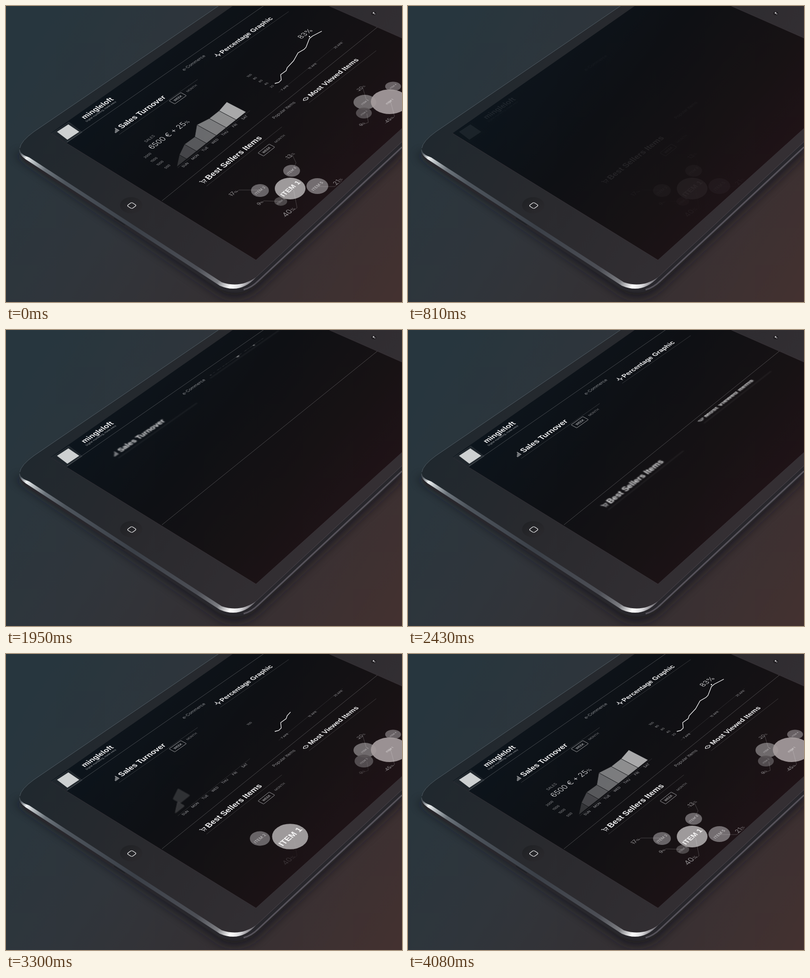
An HTML page for the animation above (4.11 s loop, 800 by 600 pixels).

```html
<!DOCTYPE html>
<html lang="en">
<head>
<meta charset="utf-8">
<title>Dashboard on a tablet</title>
<style>
html, body { margin: 0; width: 100%; height: 100%; overflow: hidden; background: #303136; }
svg { display: block; width: 100vw; height: 100vh; }
text { text-anchor: middle; }
.bold { font-family: "Liberation Sans", Arial, sans-serif; font-weight: 700; }
.thin { font-family: Inter, "Liberation Sans", sans-serif; font-weight: 300; }
.mid { font-family: Inter, "Liberation Sans", sans-serif; font-weight: 400; }
</style>
</head>
<body>
<svg id="stage" viewBox="0 0 800 600" preserveAspectRatio="xMidYMid slice">
  <defs>
    <linearGradient id="desk" gradientUnits="userSpaceOnUse" x1="20" y1="130" x2="790" y2="590">
      <stop offset="0" stop-color="#27363e"/><stop offset=".36" stop-color="#30353b"/>
      <stop offset=".66" stop-color="#353033"/><stop offset="1" stop-color="#433130"/>
    </linearGradient>
    <linearGradient id="face" gradientUnits="userSpaceOnUse" x1="80" y1="220" x2="600" y2="520">
      <stop offset="0" stop-color="#20282e"/><stop offset=".45" stop-color="#2a2a2e"/><stop offset="1" stop-color="#342f33"/>
    </linearGradient>
    <linearGradient id="glass" gradientUnits="userSpaceOnUse" x1="190" y1="110" x2="640" y2="470">
      <stop offset="0" stop-color="#0c151d"/><stop offset=".4" stop-color="#0e1014"/>
      <stop offset=".75" stop-color="#171214"/><stop offset="1" stop-color="#201317"/>
    </linearGradient>
    <linearGradient id="bevel" gradientUnits="userSpaceOnUse" x1="28" y1="300" x2="500" y2="575">
      <stop offset="0" stop-color="#454e56"/><stop offset=".028" stop-color="#eef1f2"/><stop offset=".055" stop-color="#bcc2c6"/>
      <stop offset=".11" stop-color="#6c747b"/><stop offset=".2" stop-color="#4d545c"/><stop offset=".5" stop-color="#3b4048"/>
      <stop offset=".78" stop-color="#4c4e55"/><stop offset=".87" stop-color="#7b7c81"/><stop offset=".92" stop-color="#fff"/>
      <stop offset=".95" stop-color="#dadadd"/><stop offset=".985" stop-color="#625f66"/><stop offset="1" stop-color="#46434a"/>
    </linearGradient>
    <linearGradient id="knob" x1="0" y1="0" x2="1" y2="1">
      <stop offset="0" stop-color="#1f2124"/><stop offset="1" stop-color="#2c2a2e"/>
    </linearGradient>
    <filter id="shade" x="-20%" y="-20%" width="140%" height="140%"><feGaussianBlur stdDeviation="10"/></filter>
    <filter id="blur" x="-20%" y="-60%" width="140%" height="220%"><feGaussianBlur stdDeviation="1"/></filter>
    <clipPath id="screen"><path d="M90 258L458 0H653L800 65V248L505 515Z"/></clipPath>
    <clipPath id="slot"><path d="M-30-22H260V60H-30Z"/></clipPath>
  </defs>
  <rect width="800" height="600" fill="url(#desk)"/>
  <path d="M17 300L436 587Q474 602 508 574L800 300V250L300 300Z" fill="#15171b" opacity=".74" filter="url(#shade)"/>
  <path d="M28 292Q24 306 44 320L430 573Q478 594 513 558L800 291V260L300 250Z" fill="#28272c"/>
  <path d="M480 575Q496 571 511 556L800 286" stroke="#57535b" stroke-width="3" fill="none"/>
  <path d="M27 291Q25 301 40 311L432 567Q474 585 506 549L490 540L60 284Z" fill="url(#bevel)"/>
  <path d="M429 0L56 255Q22 280 29 295Q32 302 47 307L436 560Q474 573 506 549L800 275V0Z" fill="url(#face)"/>
  <path d="M429 0L56 255Q30 274 28 288" fill="none" stroke="#4d5860" stroke-width="1"/>
  <path d="M506 549L800 275" fill="none" stroke="#4b454c" stroke-width="1"/>
  <path d="M90 258L458 0H653L800 65V248L505 515Z" fill="url(#glass)"/>
  <path d="M90 258L505 515L800 248M653 0L800 65" fill="none" stroke="#423a40" stroke-width=".6"/>
  <path d="M218 430L240 444" stroke="#1d2025" stroke-width="2"/>
  <ellipse cx="253" cy="404" rx="22.5" ry="16.5" fill="url(#knob)"/>
  <rect id="home" x="-5.8" y="-5.8" width="11.6" height="11.6" rx="2.8" fill="none" stroke="#e4e4e6" stroke-width="1.3"/>
  <ellipse cx="743" cy="15" rx="5" ry="3.8" fill="#1f1d20"/>
  <circle cx="742.5" cy="14" r="1.7" fill="#c4c2c5"/><circle cx="745" cy="16" r="1.2" fill="#8d8a8e"/>
  <g id="ui" clip-path="url(#screen)"></g>
</svg>
<script>
const LOOP = 4110, START = 1620;
const ui = document.getElementById('ui');
const items = [];
const clamp = v => Math.max(0, Math.min(1, v));
const easeInOut = p => p < .5 ? 2 * p * p : 1 - 2 * (1 - p) ** 2;
const easeOut = p => 1 - (1 - p) ** 3;
const back = p => 1 + 4.4 * (p - 1) ** 3 + 3.4 * (p - 1) ** 2;

// Local directions of the screen plane, in radians
function axes(x, y) {
  const across = -33.9 - 7.5 * (.568 * (x - 90) + .823 * (y - 258)) / 447;
  const down = 31.8 - 9 * (.526 * (x - 90) - .85 * (y - 258)) / 511;
  return [across, down].map(d => d * Math.PI / 180);
}
function tilt(x, y) {
  const [a, b] = axes(x, y);
  return `matrix(${[Math.cos(a), Math.sin(a), Math.cos(b), Math.sin(b), x, y].map(v => v.toFixed(4))})`;
}
function raise(x, y, h) {
  const b = axes(x, y)[1];
  return [x - h * Math.cos(b), y - h * Math.sin(b)];
}
function el(tag, attrs, parent = ui) {
  const node = document.createElementNS('http://www.w3.org/2000/svg', tag);
  for (const k in attrs) node.setAttribute(k, attrs[k]);
  return parent.appendChild(node);
}
function label(parent, x, y, str, size, fill = '#949497', cls = 'mid') {
  const node = el('text', { transform: tilt(x, y), y: size * .36, 'font-size': size, fill, class: cls }, parent);
  node.textContent = str;
  return node;
}
// "late" parts leave in the second half of the exit
function animate(kind, t0, dur, node, late, extra) {
  items.push({ kind, t0, dur, node, late, ...extra });
  return node;
}
const fade = (t0, node, late, dur = 120) => animate('fade', t0, dur, node, late);
const group = () => el('g', {});
const line = (d, color, width, parent) =>
  el('path', { d, fill: 'none', stroke: color, 'stroke-width': width }, parent);

function rule(t0, d) {
  const node = line(d, 'rgba(255,255,255,.32)', .7);
  node.setAttribute('pathLength', 1);
  node.setAttribute('stroke-dasharray', '1 1');
  animate('draw', t0, 250, node);
}

function heading(t0, x, y, str, size, icon, len, late) {
  const slot = el('g', { transform: tilt(x, y), 'clip-path': 'url(#slot)' });
  const inner = el('g', {}, slot);
  const text = el('text', { 'font-size': size, fill: '#f0f0f1', class: 'bold', style: 'text-anchor:start' }, inner);
  text.textContent = str;
  el('path', { d: icon, fill: 'none', stroke: '#d8d8da', 'stroke-width': 1.3 }, inner);
  line(`M-14 7H${len}`, 'rgba(255,255,255,.2)', .7, inner);
  animate('slide', t0, 240, slot, late, { inner });
}

function period(t0, x, y, mx, my, late) {
  const g = group();
  el('rect', { transform: tilt(x, y), x: -14.5, y: -6.5, width: 29, height: 13, rx: 1, fill: 'none', stroke: '#a6a6a9', 'stroke-width': .8 }, g);
  label(g, x, y, 'WEEK', 6.6, '#dcdcde');
  label(g, mx, my, 'MONTH', 6.4, '#808084');
  fade(t0, g, late);
}

function bubble(t0, x, y, rx, ry, color, str, size, ink, late) {
  const g = group();
  el('ellipse', { cx: x, cy: y, rx, ry, fill: color, 'fill-opacity': .92 }, g);
  label(g, x, y, str, size, ink, size > 10 ? 'bold' : 'mid');
  animate('pop', t0, 210, g, late, { x, y });
}

function share(t0, x, y, value, size, path, late) {
  const g = group();
  line(path, 'rgba(255,255,255,.34)', .6, g);
  const text = label(g, x, y, value, size, '#aba9ab', 'thin');
  const sign = el('tspan', { 'font-size': size * .6 }, text);
  sign.textContent = '%';
  fade(t0, g, late);
}

document.getElementById('home').setAttribute('transform', tilt(254, 404.5));

// Header
const mark = group();
el('path', { d: 'M92 258L127 235L154 256L123 277Z', fill: '#1f262c', stroke: '#2f363c', 'stroke-width': .7 }, mark);
el('path', { d: 'M103 255L126 240L148 255L124 271Z', fill: '#cdd0d1' }, mark);
fade(1620, mark, true, 180);
const brand = group();
label(brand, 184, 207, 'mingleloft', 15, '#f1f1f2', 'bold');
label(brand, 192, 213.5, 'Digital marketing, made easy.', 5.3, '#a5a8ab');
fade(1680, brand, true, 180);
rule(1620, 'M123 276L520 0');
rule(1650, 'M315 395L750 43');
fade(1770, label(ui, 379, 115, 'e-Commerce', 8.6, '#b4b6b9', 'thin'), true);
fade(2700, label(ui, 561, 211, 'Popular Items', 8.6, '#b2b2b5', 'thin'), true);

heading(1755, 234, 249, 'Sales Turnover', 15.4, 'M-14 0V-3M-11.500 0V-5M-9 0V-7M-6.500 0V-10', 180);
heading(1890, 438, 97, 'Percentage Graphic', 13.2, 'M-13-4H-10L-8.500-9L-6.500 0L-5-4H-2', 155);
heading(2220, 410, 353, 'Best Sellers Items', 16, 'M-14-10H-12L-10-3.500H-5L-3.500-8H-11M-10-2V0M-5.500-2V0', 180, true);
heading(2325, 617, 184.5, 'Most Viewed Items', 13.7, 'M-15-4.500Q-9.500-11-4-4.500Q-9.500 2-15-4.500ZM-10.500-4.500H-8.500', 158);
period(2130, 347, 187, 375, 167);
period(2640, 526, 292, 553, 269, true);

// Weekly bars
fade(2730, line('M347 328L493 212', 'rgba(255,255,255,.2)', .6));
['SUN', 'MON', 'TUE', 'WED', 'THU', 'FRI', 'SAT'].forEach((day, i) =>
  fade(2740 + i * 20, label(ui, 362 + i * 20, 322 - i * 16, day, 6.8, '#a6a6a9')));
const heights = [0, 17, 28, 27, 45, 39, 39, 44];
const foot = i => [345 + i * 20, 326 - i * 15.9];
for (let i = 0; i < 7; i++) {
  const a = foot(i), b = foot(i + 1);
  const pts = [a, raise(...a, heights[i]), raise(...b, heights[i + 1]), b];
  const bar = el('polygon', { points: pts.join(' '), fill: '#fff', 'fill-opacity': .15 + .075 * i + (i > 5 ? .04 : 0), stroke: '#121316', 'stroke-width': .7 });
  animate('drop', 3180 + i * 60, 240, bar, false, { x: a[0], y: a[1] });
}
[[286, 303, '2000'], [299, 311.5, '1500'], [311, 318.5, '1000'], [326, 325.5, '500']].forEach(([x, y, s], i) =>
  fade(3440 + i * 70, label(ui, x, y, s, 6.6)));
fade(3780, label(ui, 290, 269, 'SALES', 7.4, '#aeaeb1', 'thin'));
const total = label(ui, 329, 260, '6500 € + 25', 15, '#e8e8ea', 'thin');
el('tspan', { 'font-size': 9 }, total).textContent = '%';
fade(3810, total, false, 180);

// Percentage line
fade(2730, line('M551 175L680 70', 'rgba(255,255,255,.18)', .6));
[[563, 166, '7 APR'], [619, 122, '15 APR'], [671, 80, '25 APR']].forEach(([x, y, s], i) =>
  fade(2730 + i * 50, label(ui, x, y, s, 5.8, '#a0a0a3')));
['100', '80', '60', '40', '20'].forEach((s, i) =>
  fade(i ? 3400 + i * 65 : 2880, label(ui, 491.5 + i * 11.4, 141 + i * 5.5, s, 6, '#a0a0a3')));
const trend = line('M543 157L551 155L556 150L555 139L566 131L568 125L581 111L590 95L602 88L606 84L613 66L619 61L638 51', '#f2f2f3', 1.3);
trend.setAttribute('pathLength', 1);
trend.setAttribute('stroke-dasharray', '1 1');
animate('draw', 2955, 930, trend);
const peak = group();
el('circle', { cx: 613, cy: 62, r: 1.3, fill: '#fff' }, peak);
label(peak, 604, 56, '83%', 14, '#e8e8ea', 'thin');
fade(3840, peak, false, 150);

// Most viewed
bubble(3000, 725, 195, 23, 15, '#777274', 'ITEM 2', 5, '#c5c2c4');
bubble(3090, 782, 163, 16, 9.5, '#6f696b', 'ITEM 4', 4.6, '#c5c2c4');
bubble(3150, 723, 217, 16, 11, '#575254', 'ITEM 3', 4.6, '#aaa7a9');
bubble(2760, 775, 194, 38, 25, '#a59d9e', 'ITEM 1', 5.4, '#f0eeee');
share(3120, 717, 166, '20', 9.5, 'M711 173L721 167L728 190');
share(3240, 719, 239, '9', 9, 'M714 243L732 236L729 218');
share(3180, 774, 230, '45', 10, 'M766 238L785 224L777 194');

// Best sellers
bubble(3240, 513, 374, 18, 13, '#6f6c6e', 'ITEM 2', 7.4, '#c9c7c8', true);
bubble(3330, 577, 334, 17, 12, '#716d6f', 'ITEM 4', 6.6, '#c9c7c8', true);
bubble(3510, 555, 396, 13, 9, '#514c4e', 'ITEM 3', 5.6, '#a5a2a4', true);
bubble(3390, 629, 365, 22, 16, '#7b7678', 'ITEM 5', 8, '#d2d0d1', true);
bubble(3150, 574, 370, 31, 22, '#aaa6a7', 'ITEM 1', 14, '#f6f5f5', true);
share(3300, 459, 379, '17', 11.5, 'M452 385L471 373H513', true);
share(3390, 574, 303, '13', 11.5, 'M566 311L579 303L586 318L577 334', true);
share(3690, 513, 399, '9', 10, 'M508 403L521 395L555 396', true);
share(3270, 571, 417, '40', 14.5, 'M562 428L588 409L581 373', true);
share(3450, 670, 355, '21', 12, 'M632 366H664L679 354', true);

function update(t) {
  const leaving = t < START;
  const early = 1 - clamp(t / 525), late = 1 - .92 * clamp((t - 540) / 270);
  for (const it of items) {
    const p = leaving ? 1 : clamp((t - it.t0) / it.dur);
    const { node } = it;
    let alpha = p > 0 ? 1 : 0;
    if (it.kind === 'fade') alpha = p;
    if (it.kind === 'draw') node.setAttribute('stroke-dashoffset', 1 - p);
    if (it.kind === 'pop')
      node.setAttribute('transform', `translate(${it.x} ${it.y}) scale(${Math.max(0, back(p))}) translate(${-it.x} ${-it.y})`);
    if (it.kind === 'drop') {
      const [x, y] = raise(it.x, it.y, 36 * (1 - easeOut(p)));
      node.setAttribute('transform', `translate(${x - it.x} ${y - it.y})`);
      alpha = clamp(p * 2.5);
    }
    if (it.kind === 'slide') it.inner.setAttribute('transform', `translate(0 ${-26 * (1 - easeInOut(p))})`);
    const moving = p > 0 && p < (it.kind === 'slide' ? .95 : .6);
    if (it.kind === 'drop' || it.kind === 'slide') {
      const target = it.inner || node;
      if (moving) target.setAttribute('filter', 'url(#blur)');
      else target.removeAttribute('filter');
    }
    node.setAttribute('opacity', leaving ? alpha * (it.late ? late : early) : alpha);
  }
}

const origin = performance.now();
function tick() {
  const t = (performance.now() - origin) % LOOP;
  update(Math.floor(t / 30) * 30);
  requestAnimationFrame(tick);
}
update(0);
requestAnimationFrame(tick);
</script>
</body>
</html>
```
